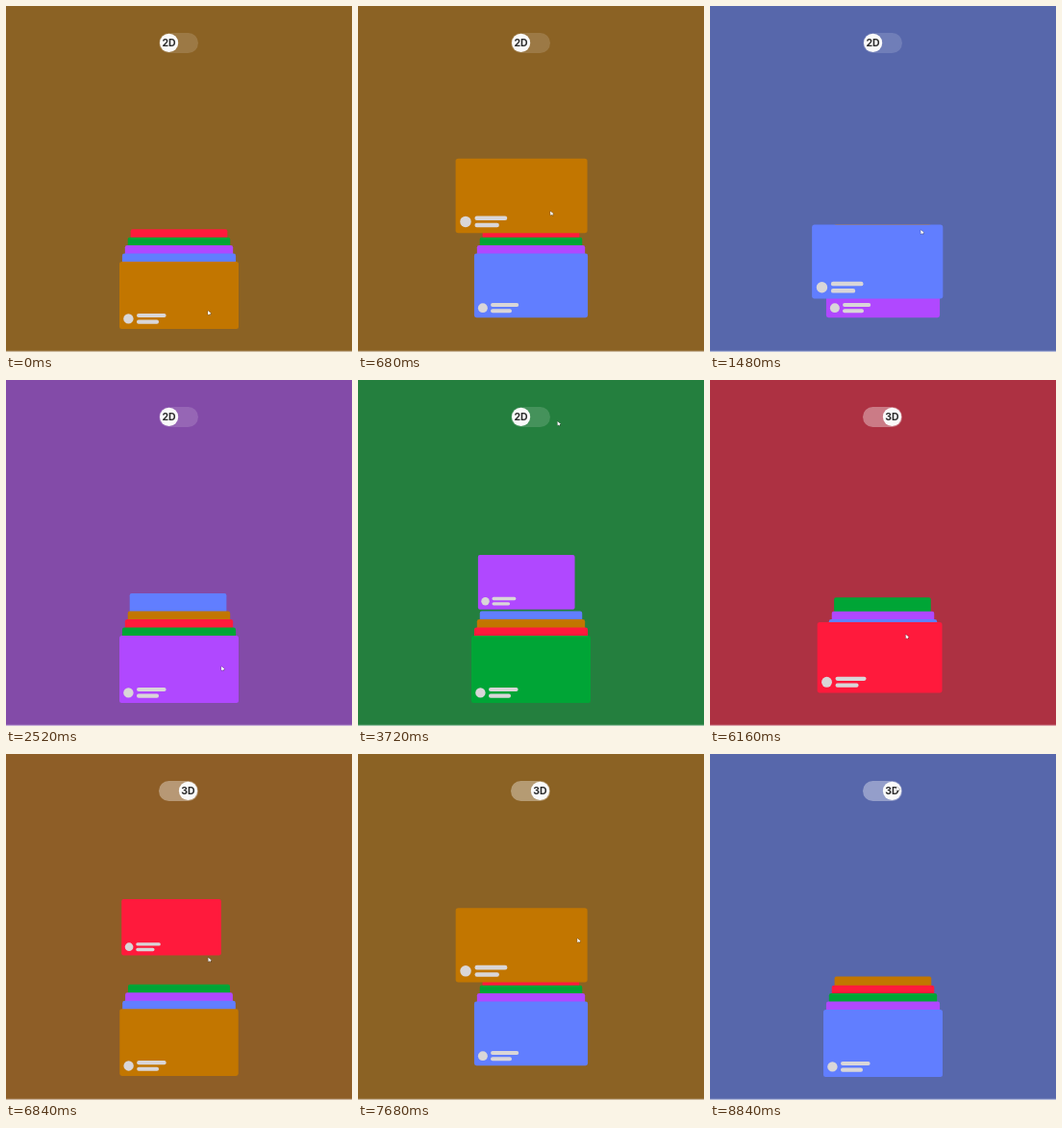
These frames come from a looping animation (360 by 360 pixels, 8880 ms). An HTML page with a canvas:

```html
<!DOCTYPE html>
<html lang="en">
<head>
<meta charset="utf-8">
<title>Card stack</title>
<style>
  html, body { margin: 0; width: 100%; height: 100%; overflow: hidden; background: #8b6224; }
  canvas { display: block; width: 100vw; height: 100vh; }
</style>
</head>
<body>
<canvas id="stage"></canvas>
<script>
const LOOP = 8880, SIZE = 360;
const canvas = document.getElementById('stage');
const ctx = canvas.getContext('2d');
const ratio = Math.max(1, window.devicePixelRatio || 1);
canvas.width = canvas.height = SIZE * ratio;

// front to back at the start of the loop
const cards = [
  { fill: '#c27600', page: [139, 98, 36] },
  { fill: '#617eff', page: [87, 103, 171] },
  { fill: '#b048ff', page: [131, 75, 168] },
  { fill: '#00a536', page: [36, 127, 62] },
  { fill: '#ff1a3c', page: [173, 49, 66] }
];
const COUNT = cards.length;

// every drag has the same length and the same pull
const DRAG = 700, PULL_X = -10, PULL_Y = -105, SWAP = 230, SPRING = 155;

const grab = (time, x, y) => ({ time, x, y, drag: true });
const rest = (time, x, y) => ({ time, x, y, drag: false });
const stops = [
  grab(30, 210, 317),
  grab(1210, 225, 268),
  grab(2750, 226, 328),
  rest(3720, 207.5, 43),
  rest(3950, 190, 38),
  grab(4750, 222, 300),
  grab(6012, 207, 277),
  grab(7050, 238, 294),
  rest(8840, 194, 34)
];
const drags = stops.filter(s => s.drag);
const TOGGLE = 4000;

const clamp = v => Math.min(1, Math.max(0, v));
const smooth = v => { v = clamp(v); return v * v * (3 - 2 * v); };
const easeOut = v => 1 - Math.pow(1 - clamp(v), 3);
const mix = (a, b, k) => a + (b - a) * k;
const settle = ms => (1 + ms / SPRING) * Math.exp(-ms / SPRING);
const release = d => d.time + DRAG;

function pull(d, t) {
  const k = smooth((t - d.time) / DRAG);
  return [PULL_X * Math.sqrt(k), PULL_Y * k];
}

function pointer(t) {
  const n = Math.max(0, stops.filter(s => s.time <= t).length - 1);
  const from = stops[n], to = stops[n + 1] || from;
  const [dx, dy] = from.drag ? pull(from, t) : [0, 0];
  const leave = from.drag ? release(from) : from.time;
  const k = smooth((t - leave) / Math.max(1, to.time - leave));
  return [mix(from.x + dx, to.x, k), mix(from.y + dy, to.y, k)];
}

function pill(x, y, w, h, r, fill) {
  ctx.fillStyle = fill;
  ctx.beginPath();
  ctx.roundRect(x, y, w, h, r);
  ctx.fill();
}

function disc(x, y, r, fill) {
  ctx.fillStyle = fill;
  ctx.beginPath();
  ctx.arc(x, y, r, 0, Math.PI * 2);
  ctx.fill();
}

function cardPose(index, t, done) {
  const slot = (index - done % COUNT + COUNT) % COUNT;
  let level = slot, dx = 0, dy = 0, grow = 1;
  if (done) {
    const from = (slot + 1) % COUNT;
    level = mix(from, slot, easeOut((t - release(drags[done - 1])) / SWAP));
  }
  drags.forEach((d, n) => {
    if (n % COUNT !== index || t < d.time) return;
    const since = Math.max(0, t - release(d));
    const [px, py] = pull(d, t);
    dx += px * settle(since);
    dy += py * settle(since);
    grow += 0.105 * smooth((t - d.time) / 320) * (1 - easeOut(since / SWAP));
  });
  return { slot, x: 180 + dx, y: 301 - 10.1 * level + dy, scale: (1 - 0.047 * level) * grow };
}

function drawCard(card, pose) {
  const ink = '#d9d6d8';
  ctx.save();
  ctx.translate(pose.x, pose.y);
  ctx.scale(pose.scale, pose.scale);
  pill(-62, -35, 124, 70, 2.5, card.fill);
  disc(-52.6, 24.4, 5.2, ink);
  pill(-44, 19, 30.6, 4.1, 2, ink);
  pill(-44, 25.6, 23, 4.1, 2, ink);
  ctx.restore();
}

function drawToggle(t) {
  const k = smooth((t - TOGGLE) / 200);
  const x = mix(169.6, 189.5, k);
  pill(159, 28, 41, 21, 10.5, `rgba(255,255,255,${mix(0.15, 0.36, k)})`);
  disc(x, 38.4, 9.6, '#fafafa');
  ctx.fillStyle = '#2b2b2b';
  ctx.font = '700 10.5px Inter, sans-serif';
  ctx.textAlign = 'center';
  ctx.fillText(k < 0.5 ? '2D' : '3D', x, 42.2);
}

function drawPointer([x, y]) {
  ctx.beginPath();
  ctx.moveTo(x, y);
  ctx.lineTo(x + 0.2, y + 4.4);
  ctx.lineTo(x + 1.4, y + 3.5);
  ctx.lineTo(x + 2.6, y + 4.9);
  ctx.lineTo(x + 2.3, y + 3.1);
  ctx.lineTo(x + 3.6, y + 2.9);
  ctx.closePath();
  ctx.lineWidth = 0.8;
  ctx.strokeStyle = 'rgba(40,40,40,.55)';
  ctx.stroke();
  ctx.fillStyle = '#fff';
  ctx.fill();
}

function drawPage(t, done) {
  const to = cards[done % COUNT].page;
  const from = done ? cards[(done - 1) % COUNT].page : to;
  const k = done ? easeOut((t - release(drags[done - 1])) / SWAP) : 1;
  ctx.fillStyle = `rgb(${to.map((v, i) => Math.round(mix(from[i], v, k)))})`;
  ctx.fillRect(0, 0, SIZE, SIZE);
  ctx.fillStyle = 'rgba(255,255,255,.55)';
  ctx.fillRect(0, SIZE - 1.2, SIZE, 1.2);
}

function draw(t) {
  const done = drags.filter(d => t >= release(d)).length;
  ctx.setTransform(ratio, 0, 0, ratio, 0, 0);
  drawPage(t, done);
  cards.map((card, i) => ({ card, pose: cardPose(i, t, done) }))
    .sort((a, b) => b.pose.slot - a.pose.slot)
    .forEach(({ card, pose }) => drawCard(card, pose));
  drawToggle(t);
  drawPointer(pointer(t));
}

const start = performance.now();
function tick() {
  draw((performance.now() - start) % LOOP);
  requestAnimationFrame(tick);
}
tick();
</script>
</body>
</html>
```
